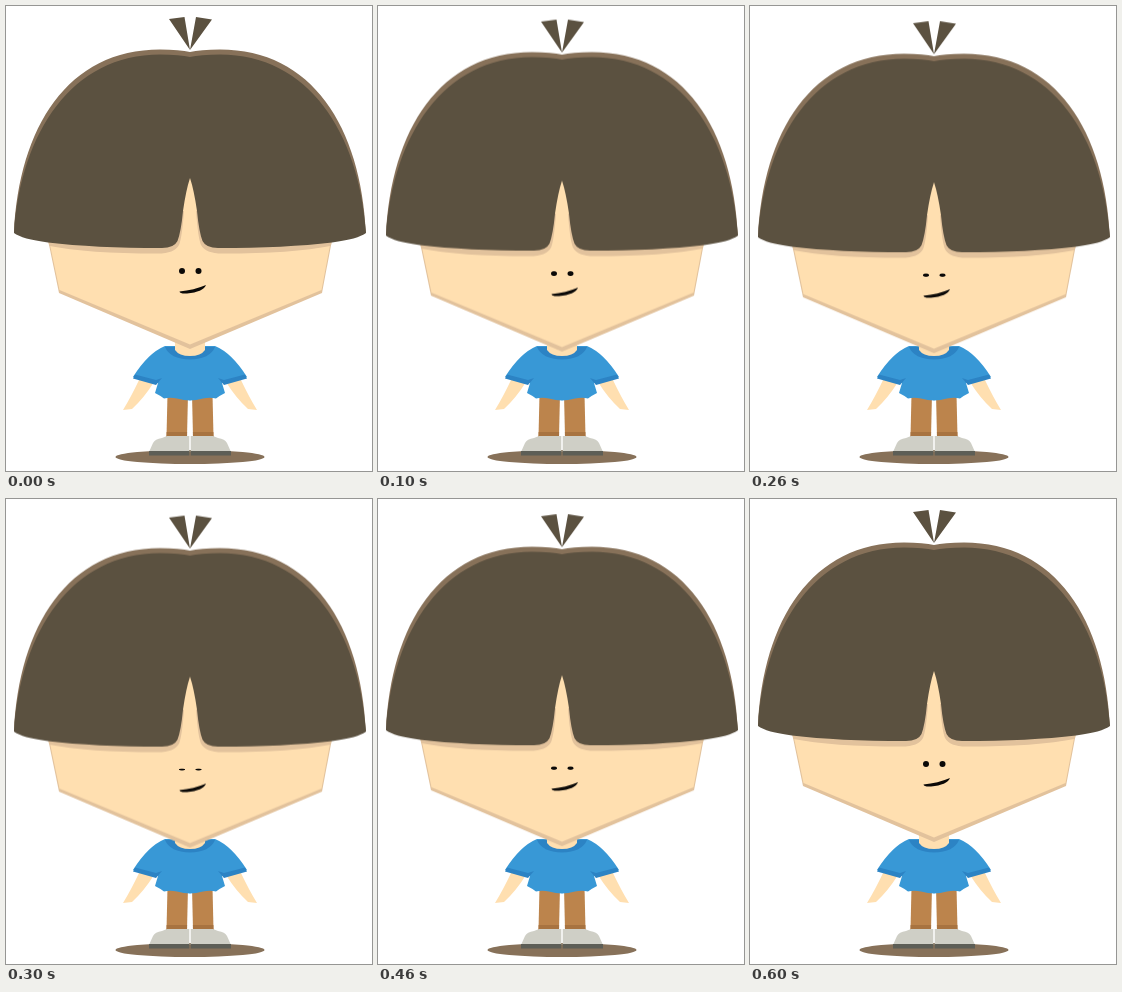
Animation of 366x465 px, one loop 700 ms. Source, as an HTML page:

```html
<!DOCTYPE html>
<html lang="en">
<head>
<meta charset="utf-8">
<title>Bobbing boy</title>
<style>
  html, body { margin: 0; width: 100%; height: 100%; overflow: hidden; background: #fff; }
  svg { display: block; width: 366px; height: 465px; }

  .head { animation: bob 700ms step-end infinite; }
  .eye { transform-box: fill-box; transform-origin: center; animation: blink 700ms step-end infinite; }

  @keyframes bob {
    0%, 85.714%, 100% { transform: translateY(0); }
    14.285%, 71.428% { transform: translateY(2.6px); }
    28.571%, 57.142% { transform: translateY(4.2px); }
    42.857% { transform: translateY(5.6px); }
  }
  @keyframes blink {
    0%, 85.714%, 100% { transform: scaleY(1); }
    14.285%, 71.428% { transform: scaleY(.8); }
    28.571%, 57.142% { transform: scaleY(.55); }
    42.857% { transform: scaleY(.3); }
  }
</style>
</head>
<body>
<svg viewBox="0 0 366 465">
  <defs>
    <clipPath id="face"><path d="M42 234H326L316 287L184 343L53 287ZM160 165H208V236H160Z"/></clipPath>

    <!-- left half of the body, mirrored around x = 184 -->
    <g id="side">
      <path fill="#ffdfb0" d="M134 372L148 376Q138 392 126 403L117 404Q125 391 134 372Z"/>
      <path fill="#bc844c" d="M161.5 388H182L181 431H160.5Z"/>
      <path fill="#a87340" d="M160.6 426H181.1L181 431H160.5Z"/>
      <path fill="#cfcfc6" d="M143 446L147 437Q149 433 156 432L161 430H183.3V446Z"/>
      <path fill="#5d5e56" d="M143 445H183.3V449.5H143Z"/>
      <path fill="#3898d6" d="M184.3 340H159Q142 347 127 371L152 377L149 387Q155 390 158 392.5Q164 391 171 392.5Q178 394.5 184.3 394.5Z"/>
      <path fill="#2c83c4" d="M129 368.5L150 374L156 372L150 379L127 372.5Z"/>
    </g>
  </defs>

  <ellipse cx="184" cy="451" rx="74.5" ry="7" fill="#877159"/>
  <use href="#side"/>
  <use href="#side" transform="matrix(-1 0 0 1 368 0)"/>
  <path fill="#2c83c4" d="M159 341Q164 353 184 353.5Q204 353 209 341Z"/>
  <path fill="#ffdfb0" d="M169 334H199V344Q195 350 184 350Q173 350 169 344Z"/>

  <g class="head">
    <path fill="#e2c29c" d="M42 234H326L316 287L184 343L53 287Z"/>
    <path fill="#ffdfb0" d="M43 234H325L315.5 284L184 338.5L53.5 284ZM160 165H208V236H160Z"/>
    <g clip-path="url(#face)" fill="#e2c29c">
      <path id="shade" d="M8 230Q50 247.5 150 247.5Q168 248 173 239Q176 232 178 205H160V220H8Z"/>
      <use href="#shade" transform="matrix(-1 0 0 1 368 0)"/>
    </g>
    <path fill="#877159" d="M8 227C13 121 62 43.5 154 43.5Q174 43.5 184 46Q194 43.5 214 43.5C306 43.5 355 121 360 227L340 222L184 150L28 222Z"/>
    <path fill="#5b5140" d="M8 227C15 126 66 48.5 154 48.5Q174 48.5 184 51Q194 48.5 214 48.5C302 48.5 353 126 360 227Q352 233 326 236.5Q280 242 212 242Q200 242 196.5 235Q193 226 191 205Q188 184 184 172Q180 184 177 205Q175 226 171.5 235Q168 242 156 242Q88 242 42 236.5Q16 233 8 227Z"/>
    <path fill="#5b5140" d="M163 13L178.5 11L184 44ZM190 11L206 13.5L184 44Z"/>
    <g fill="#0b0907">
      <circle class="eye" cx="176" cy="265" r="3"/>
      <circle class="eye" cx="192.5" cy="265" r="3"/>
      <path d="M173.5 285.5Q188 284 200 279Q197 286 181 287.5Q174 288 173.5 285.5Z"/>
    </g>
  </g>
</svg>
</body>
</html>
```
